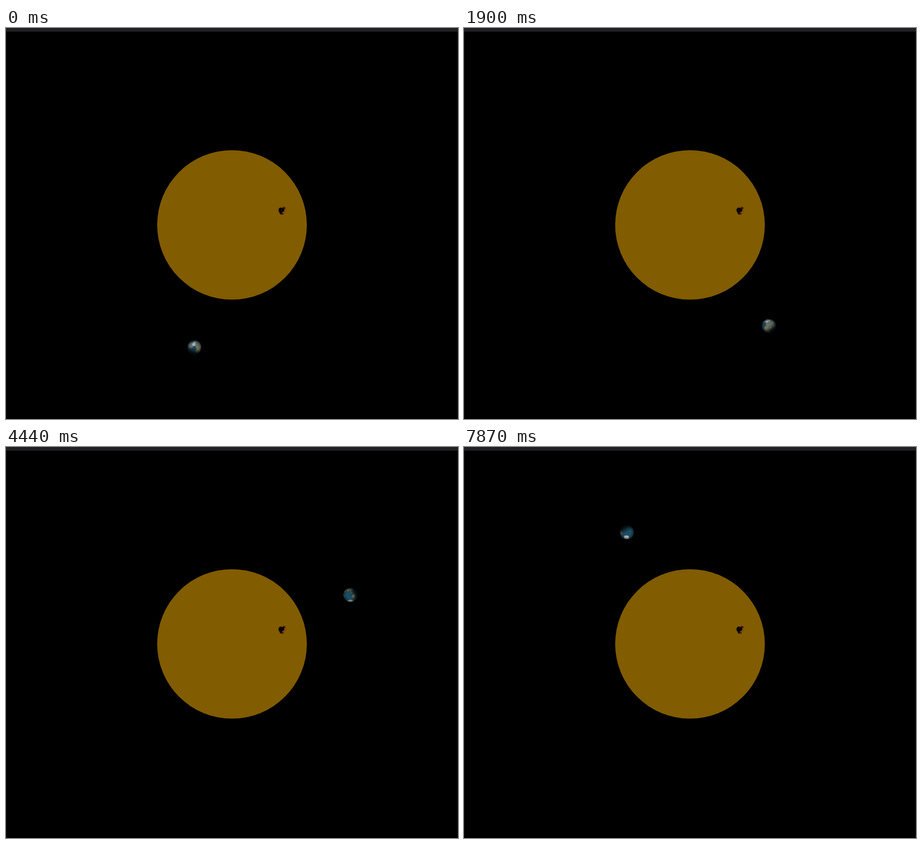
Animation of 804x696 px, one loop 7.99 s. Source, as an HTML page with a canvas:

```html
<!DOCTYPE html>
<html lang="en">
<head>
<meta charset="utf-8">
<title>Planet orbiting a sun</title>
<style>
html, body { margin: 0; width: 100%; height: 100%; overflow: hidden; background: #000; }
canvas { display: block; width: 804px; height: 696px; }
</style>
</head>
<body>
<canvas id="stage" width="804" height="696"></canvas>
<script>
const ctx = document.getElementById('stage').getContext('2d');
const LOOP = 7990;
const SUN = { x: 402, y: 350.5, r: 133.1 };
const ORBIT = 228;
const R = 12.3;
const rad = deg => deg * Math.PI / 180;

// Orbit angle in degrees, counter-clockwise, at a few times.
const keys = [
  { t: 0, a: -107.1 }, { t: 1180, a: -71.6 }, { t: 2680, a: -28.6 }, { t: 4440, a: 22.5 },
  { t: 5640, a: 56.4 }, { t: 6660, a: 85.7 }, { t: 7870, a: 119.5 }, { t: LOOP, a: 123 }
];

// Land and ice as round caps on the globe; all values in degrees.
const land = [
  { lat: 52, lon: 20, size: 20, color: '#6f7b72' },
  { lat: 55, lon: 85, size: 30, color: '#66766c' },
  { lat: 32, lon: 105, size: 19, color: '#6f755f' },
  { lat: 24, lon: 45, size: 13, color: '#948a6a' },
  { lat: 15, lon: 10, size: 23, color: '#857b5c' },
  { lat: -12, lon: 25, size: 17, color: '#66705a' },
  { lat: 22, lon: 78, size: 9, color: '#827d60' },
  { lat: 0, lon: 112, size: 8, color: '#5f7460' },
  { lat: -25, lon: 134, size: 16, color: '#9a8464' },
  { lat: 52, lon: -85, size: 26, color: '#6f7b72' },
  { lat: 72, lon: -40, size: 14, color: '#b9c2c0' },
  { lat: 90, lon: 0, size: 13, color: '#a9b4b3' },
  { lat: -86, lon: 80, size: 22, color: '#c3cac8' }
];

function blob(x, y, rx, ry, fill, turn = 0) {
  ctx.fillStyle = fill;
  ctx.beginPath();
  ctx.ellipse(x, y, rx, ry, turn, 0, Math.PI * 2);
  ctx.fill();
}

// The planet moves in held steps that divide each stretch evenly.
function orbitAngle(t) {
  let i = 0;
  while (i < keys.length - 2 && t >= keys[i + 1].t) i++;
  const from = keys[i], to = keys[i + 1];
  const pace = i ? 133 : 70;
  const steps = Math.round((to.t - from.t) / pace);
  const part = (t + .5 - from.t) / (to.t - from.t);
  return from.a + (to.a - from.a) * Math.floor(part * steps) / steps;
}

function drawFrame() {
  ctx.fillStyle = '#000';
  ctx.fillRect(0, 0, 804, 696);
  ctx.fillStyle = '#0c0c0a';
  ctx.fillRect(0, 0, 1, 696);
  ctx.fillRect(802, 0, 2, 696);
  ctx.fillStyle = '#212124';
  ctx.fillRect(0, 0, 804, 6.5);
}

function drawSun() {
  blob(SUN.x, SUN.y, SUN.r, SUN.r, '#815c00');
  blob(492, 324.5, 6.5, 7, 'rgba(130, 72, 8, .6)');
  blob(494.5, 320.5, 2.6, 2, '#3a1800');
  blob(491, 330.5, 2.8, 2, '#4a2000');
  blob(488.5, 324.5, 3.9, 4.8, '#080400');
  blob(491.5, 324, 3.6, 3.4, '#080400');
  blob(488.8, 329.8, 2, 2, '#140800');
}

function drawLand(cap, viewLat, viewLon) {
  const lat = rad(cap.lat), lon = rad(cap.lon - viewLon), size = rad(cap.size);
  const x = Math.cos(lat) * Math.sin(lon);
  const y = Math.sin(lat) * Math.cos(viewLat) - Math.cos(lat) * Math.sin(viewLat) * Math.cos(lon);
  const z = Math.sin(lat) * Math.sin(viewLat) + Math.cos(lat) * Math.cos(viewLat) * Math.cos(lon);
  if (z < -.1) return;
  const w = R * Math.sin(size), d = R * Math.cos(size);
  blob(x * d, -y * d, w * Math.max(z, .12), w, cap.color, Math.atan2(-y, x));
}

function drawPlanet(angle) {
  const ux = Math.cos(rad(angle)), uy = -Math.sin(rad(angle));
  ctx.save();
  ctx.translate(SUN.x + ORBIT * ux, SUN.y + ORBIT * uy);
  ctx.beginPath();
  ctx.arc(0, 0, R, 0, Math.PI * 2);
  ctx.clip();
  ctx.fillStyle = '#1f566d';
  ctx.fillRect(-R, -R, 2 * R, 2 * R);

  // The north shows below the sun, the south above it.
  const viewLat = rad(50 * uy);
  land.forEach(cap => drawLand(cap, -viewLat * -1, angle + 80));

  // Night falls on the side facing away from the sun.
  const night = ctx.createLinearGradient(-ux * R, -uy * R, ux * R, uy * R);
  night.addColorStop(0, 'rgba(0, 0, 0, .1)');
  night.addColorStop(.5, 'rgba(0, 0, 0, .1)');
  night.addColorStop(1, 'rgba(0, 0, 0, .95)');
  ctx.fillStyle = night;
  ctx.fillRect(-R, -R, 2 * R, 2 * R);

  const rim = ctx.createRadialGradient(0, 0, R * .6, 0, 0, R);
  rim.addColorStop(0, 'rgba(0, 0, 0, 0)');
  rim.addColorStop(1, 'rgba(0, 0, 0, .5)');
  ctx.fillStyle = rim;
  ctx.fillRect(-R, -R, 2 * R, 2 * R);
  ctx.restore();
}

function draw(time) {
  drawFrame();
  drawSun();
  drawPlanet(orbitAngle(time % LOOP));
}

let begin;
function loop(now) {
  begin ??= now;
  draw(Math.max(0, now - begin));
  requestAnimationFrame(loop);
}
draw(0);
requestAnimationFrame(loop);
</script>
</body>
</html>
```
